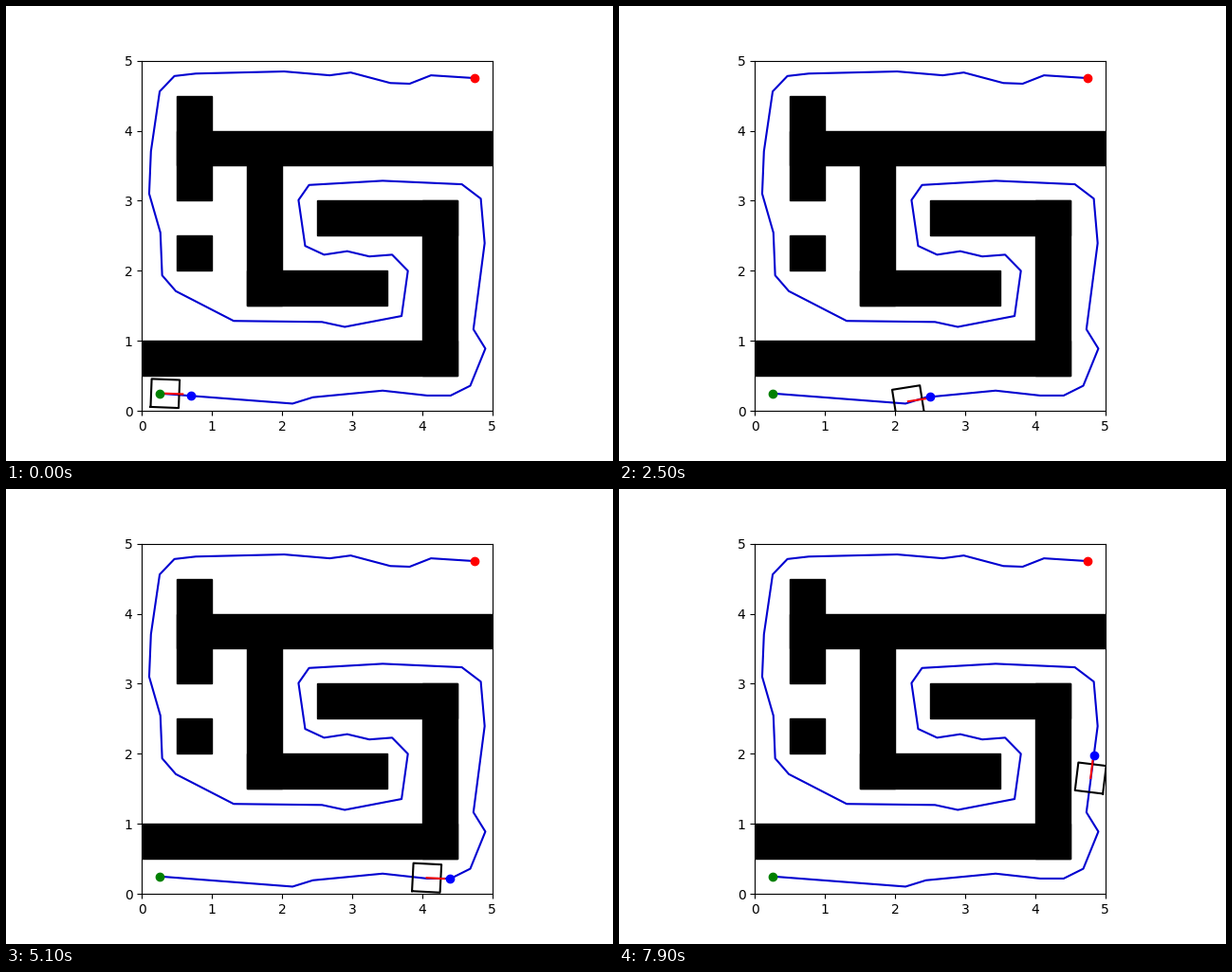
These frames come from a looping animation (640x480 px, 8 s). A matplotlib script:

```python
import numpy as np
import matplotlib.pyplot as plt
from matplotlib.animation import FuncAnimation
from matplotlib.patches import Rectangle

FRAMES, INTERVAL = 80, 100
LEAD, STEP = 0.453, 0.0728          # target's arc length: at start, per frame
GAIN, TURN = 0.183, 0.5             # speed and heading feedback
SIDE, NOSE = 0.4, 0.25

# Turning points of the route, from start to goal
ROUTE = np.array([
    (.25, .25), (2.15, .105), (2.44, .195), (3.435, .29), (4.07, .22),
    (4.405, .22), (4.685, .36), (4.9, .89), (4.73, 1.165), (4.89, 2.395),
    (4.835, 3.03), (4.565, 3.235), (3.435, 3.285), (2.385, 3.225),
    (2.235, 3.01), (2.33, 2.355), (2.6, 2.23), (2.93, 2.28), (3.245, 2.205),
    (3.57, 2.23), (3.795, 2), (3.705, 1.355), (2.895, 1.2), (2.57, 1.27),
    (1.31, 1.285), (.485, 1.71), (.29, 1.935), (.265, 2.545), (.105, 3.1),
    (.13, 3.705), (.255, 4.56), (.465, 4.78), (.77, 4.815), (2.03, 4.845),
    (2.68, 4.79), (2.98, 4.83), (3.545, 4.68), (3.82, 4.67), (4.125, 4.79),
    (4.75, 4.75),
])
ARC = np.r_[0, np.cumsum(np.hypot(*np.diff(ROUTE, axis=0).T))]

# Walls in half-unit cells: x, y, width, height
WALLS = [(0, 1, 9, 1), (8, 1, 1, 5), (5, 5, 4, 1), (3, 3, 4, 1),
         (3, 3, 1, 4), (1, 7, 9, 1), (1, 6, 1, 3), (1, 4, 1, 1)]


def target_at(i):
    s = LEAD + STEP * i
    return np.array([np.interp(s, ARC, axis) for axis in ROUTE.T])


def drive():
    """Robot chasing the target: list of (position, heading, target)."""
    pos, head, poses = ROUTE[0], 0.0, []
    for i in range(FRAMES):
        goal = target_at(i)
        dx, dy = goal - pos
        err = np.arctan2(dy, dx) - head
        pos = pos + GAIN * np.hypot(dx, dy) * np.array(
            [np.cos(head), np.sin(head)])
        head += TURN * np.arctan2(np.sin(err), np.cos(err))
        poses.append((pos, head, goal))
    return poses


POSES = drive()
CORNERS = SIDE / 2 * np.array([(-1, -1), (1, -1), (1, 1), (-1, 1), (-1, -1)])

fig, ax = plt.subplots(figsize=(6.4, 4.8), dpi=100)
ax.set(xlim=(0, 5), ylim=(0, 5), xticks=range(6), yticks=range(6))
ax.set_aspect("equal")
for x, y, w, h in WALLS:
    ax.add_patch(Rectangle((x / 2, y / 2), w / 2, h / 2, color="black"))

ax.plot(*ROUTE.T, color="#0000d0")
body, = ax.plot([], [], "k-")
nose, = ax.plot([], [], "r-")
ax.plot(*ROUTE[0], "o", color="green")
ax.plot(*ROUTE[-1], "ro")
dot, = ax.plot([], [], "bo")


def draw(i):
    pos, head, goal = POSES[i]
    c, s = np.cos(head), np.sin(head)
    body.set_data(*(CORNERS @ np.array([(c, s), (-s, c)]) + pos).T)
    nose.set_data([pos[0], pos[0] + NOSE * c], [pos[1], pos[1] + NOSE * s])
    dot.set_data([goal[0]], [goal[1]])
    return body, nose, dot


anim = FuncAnimation(fig, draw, frames=FRAMES, interval=INTERVAL,
                     repeat=True, repeat_delay=0)
plt.show()
```
